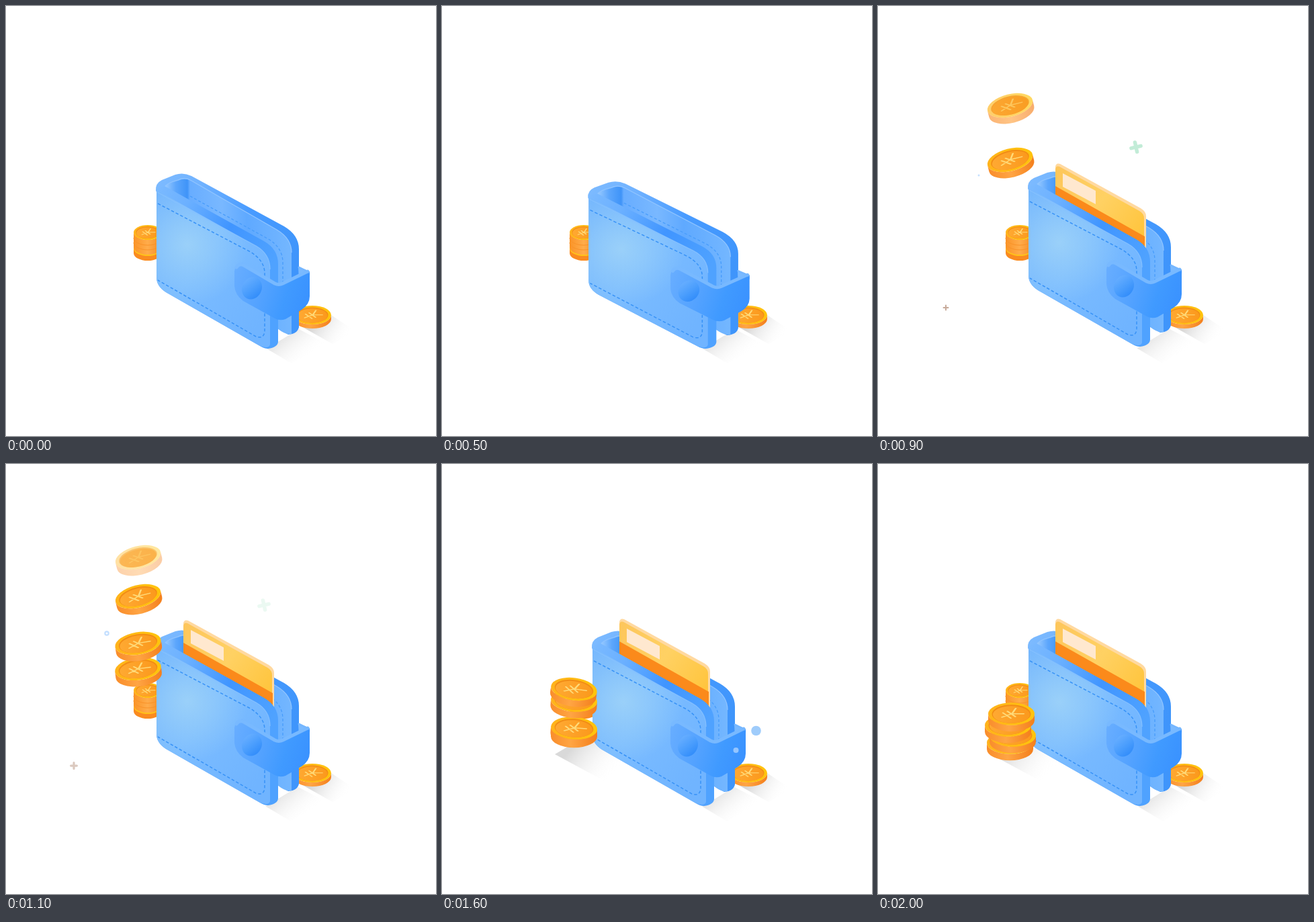
Recreate the animation shown at these times as an HTML page with a canvas. Size 640x640 px, loop 3000 ms.

```html
<!DOCTYPE html>
<html lang="en">
<head>
<meta charset="utf-8">
<title>Wallet and coins</title>
<style>
  html, body { margin: 0; width: 100%; height: 100%; overflow: hidden; background: #fff; }
  canvas { display: block; width: 100vw; height: 100vh; }
</style>
</head>
<body>
<canvas id="stage" width="640" height="640"></canvas>
<script>
const ctx = document.getElementById('stage').getContext('2d');
const LOOP = 3000, STEP = 100, LAST_STEP = 20;

// Piecewise linear value from [step, value] pairs
function key(points, s) {
  if (s <= points[0][0]) return points[0][1];
  for (let i = 1; i < points.length; i++) {
    const [a, va] = points[i - 1], [b, vb] = points[i];
    if (s <= b) return va + (vb - va) * (s - a) / (b - a);
  }
  return points[points.length - 1][1];
}

function gradient(x0, y0, x1, y1, ...stops) {
  const g = ctx.createLinearGradient(x0, y0, x1, y1);
  stops.forEach(([at, color]) => g.addColorStop(at, color));
  return g;
}

function glow(x, y, r, inner, outer) {
  const g = ctx.createRadialGradient(x, y, 0, x, y, r);
  g.addColorStop(0, inner);
  g.addColorStop(1, outer);
  return g;
}

function fill(path, style) {
  ctx.fillStyle = style;
  ctx.fill(new Path2D(path));
}

function stroke(path, style, width, dash = []) {
  ctx.strokeStyle = style;
  ctx.lineWidth = width;
  ctx.setLineDash(dash);
  ctx.stroke(new Path2D(path));
  ctx.setLineDash([]);
}

function isolated(alpha, draw) {
  if (alpha <= 0) return;
  ctx.save();
  ctx.globalAlpha = alpha;
  draw();
  ctx.restore();
}

function ellipse(x, y, rx, ry, style) {
  ctx.beginPath();
  ctx.ellipse(x, y, rx, ry, 0, 0, Math.PI * 2);
  ctx.fillStyle = style;
  ctx.fill();
}

function coinSide(rx, ry, top, bottom, style) {
  ctx.beginPath();
  ctx.ellipse(0, bottom, rx, ry, 0, 0, Math.PI);
  ctx.lineTo(-rx, top);
  ctx.ellipse(0, top, rx, ry, 0, Math.PI, 0, true);
  ctx.closePath();
  ctx.fillStyle = style;
  ctx.fill();
}

function coinFace(rx, ry) {
  ellipse(0, 0, rx, ry, gradient(-rx, 0, rx, 0, [0, '#ffb31c'], [1, '#ffc40c']));
  ellipse(0, 0, rx * .84, ry * .82, '#f28c15');
  ellipse(0, ry * .06, rx * .8, ry * .76, gradient(-rx, 0, rx, 0, [0, '#ffab35'], [1, '#fb971a']));
  ctx.save();
  ctx.scale(rx / 34, ry / 34);
  ctx.rotate(.95);
  ctx.lineCap = 'round';
  stroke('M-10 -15 L0 -1 L10 -15 M0 -1 V17 M-10 0 H10 M-10 8 H10', '#ffda78', 2.8);
  ctx.restore();
}

function coin(x, y, rx, ry, depth, tilt = 0, alpha = 1) {
  isolated(alpha, () => {
    ctx.translate(x, y);
    ctx.rotate(tilt * Math.PI / 180);
    coinSide(rx, ry, 0, depth, gradient(-rx, 0, rx, 0, [0, '#f98d2b'], [.45, '#ffa544'], [1, '#f47f1c']));
    coinFace(rx, ry);
  });
}

function backStack() {
  ctx.save();
  ctx.translate(211, 337);
  const shade = gradient(-21, 0, 21, 0, [0, '#fb9427'], [.5, '#ffac4b'], [1, '#f58a20']);
  coinSide(21, 11, 22, 31, '#fa8b20');
  coinSide(21, 11, 0, 24, '#ffc21a');
  coinSide(21, 11, 0, 22, shade);
  for (const y of [8, 15]) {
    ctx.beginPath();
    ctx.ellipse(0, y, 21, 11, 0, 0, Math.PI);
    ctx.strokeStyle = '#f99329';
    ctx.lineWidth = 1;
    ctx.stroke();
  }
  coinFace(21, 11);
  ctx.restore();
}

function groundShadows(s, lift) {
  isolated(Math.max(.15, 1 + lift / 34), () => {
    ctx.translate(lift * .8, lift * .2);
    fill('M388 510 L436 481 L478 503 L425 532 Z',
      gradient(405, 490, 440, 531, [0, '#dedede'], [1, '#fdfdfd00']));
  });
  fill('M438 476 L484 460 L520 484 L486 503 Z',
    gradient(462, 466, 507, 495, [0, '#d6d6d6'], [1, '#ffffff00']));
  isolated(key([[11, 0], [13, .28], [16, 1]], s), () =>
    fill('M168 432 L212 406 L275 441 L242 472 Z',
      gradient(195, 420, 252, 466, [0, '#d9d9d9'], [1, '#ffffff00'])));
}

function walletBack() {
  fill('M223 275 Q222 264 232 259 L252 251 Q264 247 276 253 L414 328 Q436 341 436 362 V478 Q434 488 420 489 L404 480 V390 L236 300 Z',
    gradient(224, 270, 436, 370, [0, '#7cbaff'], [.25, '#70b2ff'], [.6, '#489bff'], [1, '#3f95fb']));
  fill('M235 271 Q239 264 256 260 Q266 255 276 260 L403 333 Q425 346 425 367 V488 Q418 491 404 480 V390 L236 300 Z',
    gradient(236, 0, 425, 0, [0, '#9acbff'], [.09, '#5ca6fc'], [.18, '#3f94f8'], [.2, '#68adff'], [.45, '#79b8ff'], [.65, '#5fa9ff'], [1, '#74b7ff']));
  stroke('M235 270 Q240 263 256 259 Q266 254 276 260 L403 333 Q425 346 425 367', '#91c5ff', 1.2);
  stroke('M274 283 L389 346 Q412 359 412 382 V412', '#479cfb', 1.3, [4, 3]);
}

function card(offset) {
  ctx.save();
  ctx.translate(0, offset);
  fill('M264 236 Q265 230 271 232 L391 298 Q399 303 399 310 V400 L264 325 Z', '#ffd9a0');
  fill('M264 240 Q265 234 270 236 L389 302 Q396 306 396 313 V400 L264 325 Z',
    gradient(264, 240, 396, 340, [0, '#fdc65b'], [.5, '#ffd163'], [1, '#ffc43b']));
  fill('M264 265 L397 340 V400 L264 325 Z', '#fb8a1b');
  fill('M275 246 L324 272 V292 L275 266 Z', '#ffe8cf');
  ctx.restore();
}

function walletFront() {
  fill('M236 268 L384 350 Q405 362 405 384 V500 Q404 508 390 510 Q384 510 378 506 L238 426 Q224 417 224 404 V272 Z',
    gradient(224, 270, 405, 370, [0, '#7bbaff'], [.25, '#6bb0ff'], [.6, '#4095ff'], [.9, '#4b9fff'], [1, '#4fa2ff']));
  const face = 'M224 277 Q226 275 231 278 L372 357 Q393 369 393 392 V504 Q391 511 378 506 L238 426 Q224 417 224 404 Z';
  fill(face, gradient(224, 330, 393, 450, [0, '#75b7fd'], [.4, '#7bbcff'], [1, '#70b4ff']));
  fill(face, glow(270, 355, 90, '#9ad0f9', '#9ad0f900'));
  stroke('M225 277 L372 357 Q393 369 393 392', '#85c0ff', 1.2);
  stroke('M226 294 L362 365 Q385 378 385 398 V484 Q384 496 372 492 L226 408', '#3792f7', 1.5, [4.5, 3]);
}

function strap() {
  fill('M435 388 L450 394 Q453 396 452 402 L436 408 Z', '#7bbaff');
  fill('M340 395 Q341 384 351 382 L400 411 Q406 414 412 411 L452 395 V432 Q452 444 440 452 L416 466 Q408 469 400 465 L353 439 Q341 430 340 417 Z',
    gradient(340, 400, 452, 435, [0, '#67adff'], [.4, '#53a2ff'], [.7, '#409aff'], [1, '#3a92ff']));
  ctx.lineJoin = ctx.lineCap = 'round';
  stroke('M343 389 Q347 382 354 386 L400 413 Q406 416 412 413 L449 395', '#78b9ff', 5);
  stroke('M436 389 L450 396', '#76b7ff', 3);
  ctx.lineCap = 'butt';
  ctx.save();
  ctx.translate(366, 420);
  ctx.rotate(.45);
  ellipse(0, 0, 14.5, 17, gradient(-14, -6, 14, 8, [0, '#65adff'], [.5, '#4b9efd'], [1, '#318cfa']));
  ctx.restore();
}

// Hop with squash and stretch: lift, width, height
const hop = {
  lift: [[1, 0], [2, -12], [3, -30], [4, -22], [5, 0], [6, 0], [7, -3], [9, -3], [13, -1]],
  width: [[1, 1], [2, .98], [3, .953], [4, .975], [5, 1.05], [6, 1.015], [7, .996], [9, 1]],
  height: [[1, 1], [2, 1.025], [3, 1.05], [4, 1.025], [5, .955], [6, .985], [7, 1.006], [9, 1]]
};

function wallet(s, lift) {
  ctx.save();
  ctx.translate(338, 510 + lift);
  ctx.scale(key(hop.width, s), key(hop.height, s));
  ctx.translate(-338, -510);
  walletBack();
  if (s >= 8) card(key([[8, 32], [9, 6], [13, 0]], s));
  walletFront();
  strap();
  ctx.restore();
}

const falling = [
  { y: [[7, 106], [8, 160], [9, 212], [11, 288], [13, 340], [16, 379], [18, 394], [19, 398]],
    x: [[0, 0]], tilt: [[9, -14], [13, 0]], alpha: [[6, 0], [7, .2], [8, .65], [9, 1]] },
  { y: [[8, 106], [9, 131], [10, 190], [11, 250], [13, 340], [16, 376], [19, 387]],
    x: [[16, 0], [19, 4]], tilt: [[10, -14], [13, 0], [16, 4], [18, 0]], alpha: [[7, 0], [8, .2], [9, .65], [10, 1]] },
  { y: [[10, 110], [11, 180], [13, 312], [16, 335], [19, 372]],
    x: [[16, 0], [19, -3]], tilt: [[11, -14], [13, 7], [16, 4], [19, 0]], alpha: [[9, 0], [10, .3], [11, 1]] },
  { y: [[11, 122], [12, 195], [13, 253], [16, 318], [19, 343], [20, 355]],
    x: [[19, 0], [20, 2]], tilt: [[13, -14], [16, 8], [20, 0]], alpha: [[10, 0], [11, .4], [12, 1]] }
];

function fallingCoins(s) {
  const order = s < 14 ? [2, 0, 1, 3] : [0, 1, 2, 3];
  for (const i of order) {
    const c = falling[i];
    coin(196.5 + key(c.x, s), key(c.y, s) + 17, 34.5, 16.7, 9.5, key(c.tilt, s), key(c.alpha, s));
  }
}

function plus(x, y, r, width, angle, color, alpha) {
  isolated(alpha, () => {
    ctx.translate(x, y);
    ctx.rotate(angle);
    ctx.lineCap = 'round';
    const a = r - width / 2;
    stroke(`M${-a} 0 H${a} M0 ${-a} V${a}`, color, width);
  });
}

function sparkles(s) {
  if (s >= 7) {
    plus(384, 210, key([[7, 6], [9, 10]], s), key([[7, 3], [9, 5.5]], s), -.22, '#79d6a8',
      key([[7, .75], [9, .46], [12, 0]], s));
    plus(101, 449, key([[7, 1.5], [9, 4.5], [13, 7.5]], s), key([[7, 1.8], [9, 2], [13, 4.5]], s), 0, '#b48d78',
      key([[7, .7], [9, .75], [13, .2], [15, 0]], s));
  }
  if (s >= 9) isolated(key([[9, .4], [13, .42], [15, 0]], s), () => {
    ctx.beginPath();
    ctx.arc(150, 252, key([[9, .8], [13, 4.5], [15, 5.5]], s), 0, Math.PI * 2);
    ctx.strokeStyle = '#6eb1ff';
    ctx.lineWidth = key([[9, 1.4], [13, 3]], s);
    ctx.stroke();
  });
  if (s >= 12) {
    isolated(key([[13, .95], [16, .62], [20, 0]], s), () => {
      const r = key([[12, 1], [13, 2], [16, 7.3], [19, 10]], s);
      ellipse(467.5, 397, r, r, '#64adf9');
    });
    isolated(key([[13, 1], [16, .45], [20, 0]], s), () => {
      const r = key([[12, 1], [13, 2.2], [16, 4], [19, 5.5]], s);
      ellipse(437.5, 426, r, r, '#fff');
    });
  }
}

function frame() {
  const s = Math.min(LAST_STEP, Math.floor(performance.now() % LOOP / STEP));
  const lift = key(hop.lift, s);
  ctx.fillStyle = '#fff';
  ctx.fillRect(0, 0, 640, 640);
  groundShadows(s, lift);
  backStack();
  coin(456, 460, 28, 14, 6);
  wallet(s, lift);
  fallingCoins(s);
  sparkles(s);
  requestAnimationFrame(frame);
}
frame();
</script>
</body>
</html>
```
